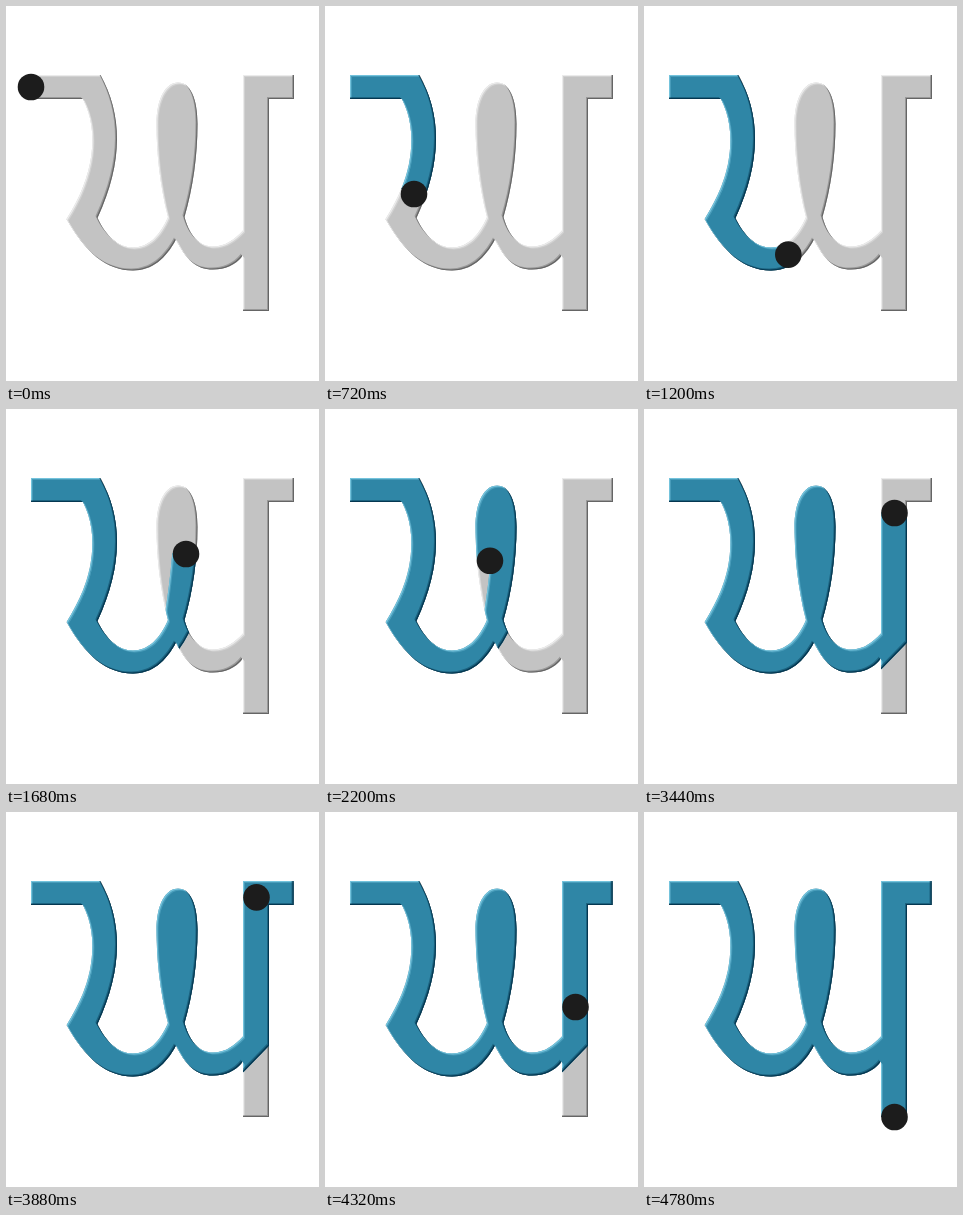
An HTML page with a canvas for the animation above (4800 ms loop, 313 by 375 pixels).

```html
<!DOCTYPE html>
<html lang="en">
<head>
<meta charset="utf-8">
<title>Letter tracing</title>
<style>
  html, body { margin: 0; width: 313px; height: 375px; overflow: hidden; background: #fff; }
  canvas { display: block; }
</style>
</head>
<body>
<canvas id="stage" width="313" height="375"></canvas>
<script>
const W = 313, H = 375, LOOP = 4800, STEP = 20;
const ctx = document.getElementById('stage').getContext('2d');

const glyph = new Path2D(`M25 69H94.5C116 108 118 155 91.5 212
  C100 230 112 241.5 127 241.5C142 241.5 154 230 162 211
  C153.5 178 150.5 145 150.5 118C150.5 92 160 76.5 172 76.5
  C184 76.5 191.5 92 191.5 118C191.5 150 187 182 178.5 211
  C184 231 194 240.5 207 240.5C219 240.5 228 234 237 224.5
  V69H288V93H263V305H237V249.5
  C229 259.5 219 263.5 207 263.5C190 263.5 180 253.5 170 233.5
  C160 252.5 146 264.5 127 264.5C100 264.5 79.5 246 60.5 213
  C88.5 170 93.5 125 77 93H25Z`);

// Pen route: each leg ends at the given time.
const legs = [
  [720, 'M25 81H85C102 112 105 150 89 188'],
  [1680, 'L76 213C88 236 104 253 127 253C146 253 160 239 171 217C175 192 178 170 180 145'],
  [2740, 'C182 112 180 90 172 90C162 90 163 112 164 128C165 160 167 190 171 213C176 236 190 252 205 253Q211 253 216 252'],
  [3440, 'C221 251 226 251 229 249L250.5 227V104'],
  [3800, 'V81H287.5H266'],
  [4320, 'H250.5V195'],
  [4780, 'V305']
];

const route = document.createElementNS('http://www.w3.org/2000/svg', 'path');
const keys = [{ time: 0, length: 0 }];
let d = '';
for (const [time, part] of legs) {
  d += part;
  route.setAttribute('d', d);
  keys.push({ time, length: route.getTotalLength() });
}
const routePath = new Path2D(d);
const total = keys[keys.length - 1].length;

function travelled(t) {
  const i = keys.findIndex(k => k.time > t);
  if (i < 0) return total;
  const a = keys[i - 1], b = keys[i];
  return a.length + (b.length - a.length) * (t - a.time) / (b.time - a.time);
}

function layer() {
  const c = document.createElement('canvas');
  c.width = W;
  c.height = H;
  return c.getContext('2d');
}

const scratch = layer();

// Paints the rim of a mask that faces away from the given shift.
function rim(target, mask, shift, color, alpha) {
  scratch.globalCompositeOperation = 'copy';
  scratch.drawImage(mask, 0, 0);
  scratch.globalCompositeOperation = 'destination-out';
  scratch.drawImage(mask, shift, shift);
  scratch.globalCompositeOperation = 'source-in';
  scratch.fillStyle = color;
  scratch.fillRect(0, 0, W, H);
  target.globalAlpha = alpha;
  target.drawImage(scratch.canvas, 0, 0);
  target.globalAlpha = 1;
}

function bevel(target, mask, light, dark) {
  target.drawImage(mask, 0, 0);
  rim(target, mask, 2, light, 0.3);
  rim(target, mask, 1, light, 0.75);
  rim(target, mask, -2, dark, 0.4);
  rim(target, mask, -1, dark, 0.85);
}

const plain = layer();
plain.fillStyle = '#c3c3c3';
plain.fill(glyph);
const base = layer();
bevel(base, plain.canvas, '#f4f4f4', '#5c5c5c');

const ink = layer();
ink.fillStyle = ink.strokeStyle = '#2f86a6';
ink.lineWidth = 27.5;
ink.lineJoin = 'miter';

function inkMask(length) {
  ink.clearRect(0, 0, W, H);
  ink.globalCompositeOperation = 'source-over';
  ink.fill(glyph);
  ink.globalCompositeOperation = 'destination-in';
  ink.setLineDash([length, total + 10]);
  ink.stroke(routePath);
  return ink.canvas;
}

function draw(t) {
  const length = travelled(t);
  ctx.fillStyle = '#fff';
  ctx.fillRect(0, 0, W, H);
  ctx.drawImage(base.canvas, 0, 0);
  if (length > 0) bevel(ctx, inkMask(length), '#83d0e8', '#003049');
  const pen = route.getPointAtLength(length);
  ctx.fillStyle = '#1c1c1c';
  ctx.beginPath();
  ctx.arc(pen.x, pen.y, 13.3, 0, Math.PI * 2);
  ctx.fill();
}

const start = performance.now();
function tick() {
  const t = (performance.now() - start) % LOOP;
  draw(Math.floor(t / STEP) * STEP);
  requestAnimationFrame(tick);
}
tick();
</script>
</body>
</html>
```
